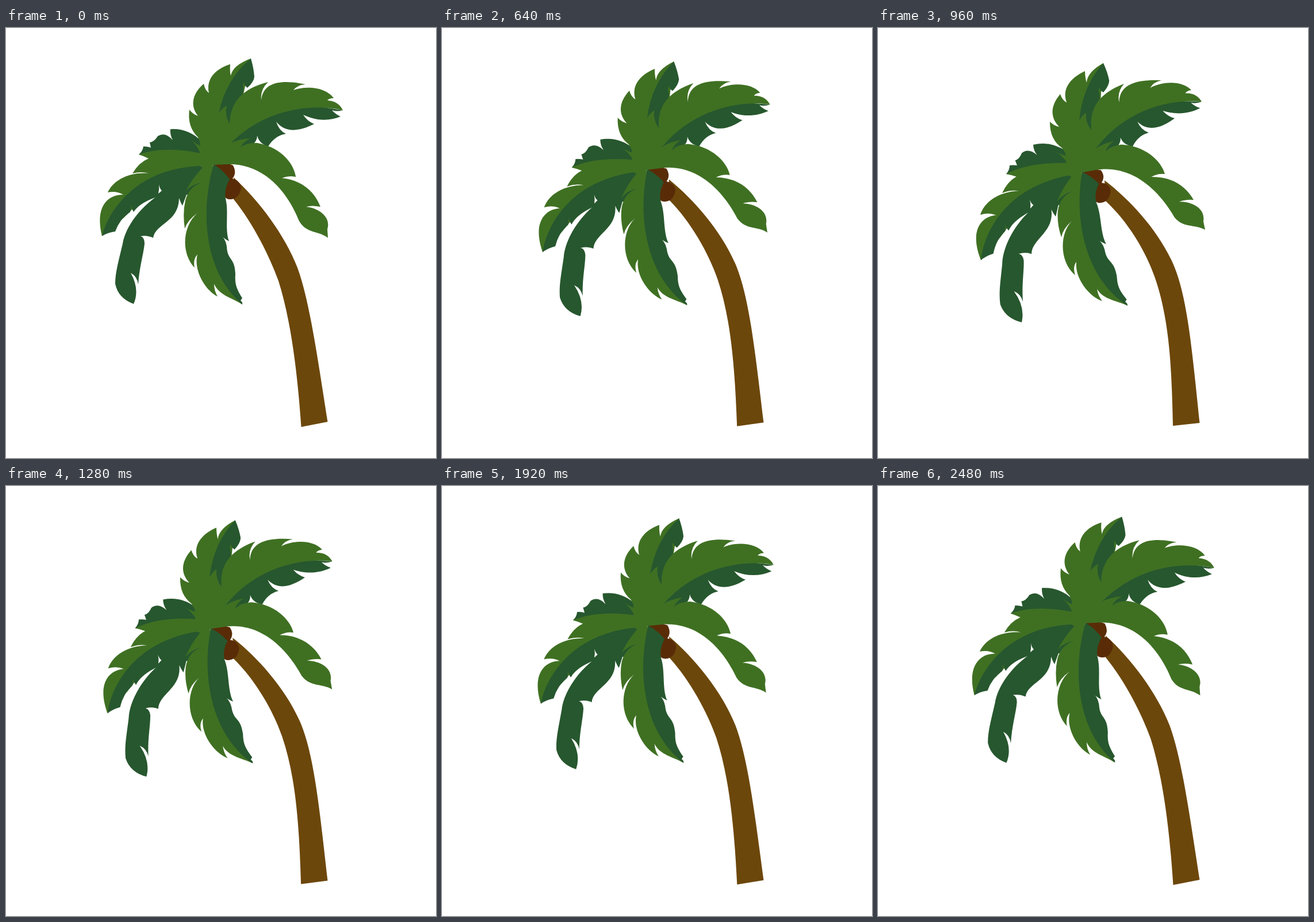
Write an HTML page that moves like this. It is 748 px wide and 748 px high and loops after 2560 ms.

```html
<!DOCTYPE html>
<html lang="en">
<head>
<meta charset="utf-8">
<title>Swaying palm</title>
<style>
  html, body { margin: 0; height: 100%; overflow: hidden; background: #fff; }
  svg { display: block; width: 100vw; height: 100vh; }
</style>
</head>
<body>
<svg id="stage" viewBox="0 0 748 748"></svg>
<script>
const LIGHT = '#3f7022', DARK = '#27572e', TRUNK = '#6c470b', NUT = '#592c07';
const LOOP = 2560, STEP = 80, PEAK = 960;

// Resting outlines, back to front
const crown = [
  // back left frond
  [DARK, `M286,176 Q317,174 340,197 L350,225 L300,235 L231,220 Q238,214 239,206 Q246,206 252,208
    L250,199 Q258,198 264,188 Q277,180 290,195 Q285,186 286,176 Z`],
  // left frond
  [LIGHT, `M231,220 C262,209 300,210 338,218 Q333,204 321,194 Q332,203 341,206 L365,215 L362,238
    L335,250 L250,285 L205,330 Q180,345 167,362 C154,310 178,289 204,290 Q192,283 177,286
    C187,264 215,250 249,253 Q235,249 220,253 Q231,234 248,227 Q240,223 231,220 Z`],
  [DARK, `M167,362 C176,325 220,245 337,240 L342,243 L348,240 L362,262 L345,290 L314,290 L307,309
    Q303,303 300,292 L262,294 Q232,304 222,320 Q217,312 217,303 Q218,314 216,320
    Q198,332 190,354 Q176,356 167,362 Z`],
  // hanging frond
  [DARK, `M258,296 C228,318 207,350 203,375 C196,405 190,425 190,445 Q195,470 222,480
    Q233,455 217,426 Q228,432 230,446 C232,415 239,395 241,375 Q241,364 234,362 Q246,360 256,365
    C260,340 300,338 301,297 L310,280 L285,275 Z`],
  ['#fff', 'M266,272 Q267,279 271,283 L265,288 Q267,280 266,272 Z'],
  // top frond
  [LIGHT, `M338,200 L334,190 Q315,172 319,142 Q325,150 334,153 C322,138 321,117 344,97
    Q346,108 353,113 C348,90 362,72 390,63 Q389,75 391,83 Q394,65 426,53 L410,130 L392,170
    L380,225 L362,238 L342,243 L336,238 Z`],
  [DARK, `M426,53 Q383,88 370,148 Q375,140 384,135 Q380,152 389,167 L405,150 L413,108
    Q411,100 414,94 Q414,100 420,104 Q431,94 432,85 Q431,70 426,53 Z`],
  ['trunk'],
  [NUT, `M361,238 Q380,232 395,239 Q402,252 394,262 Q408,266 409,279 Q405,298 390,298
    Q382,298 380,292 L365,260 Z`],
  // right frond
  [DARK, `M586,143 Q576,146 567,143 Q573,150 582,154 C562,162 540,162 517,151 Q524,162 536,167
    C510,180 486,183 470,163 Q475,179 487,184 Q468,187 456,206 Q440,201 437,187 Q437,195 431,201
    L400,215 L360,240 L400,170 L500,130 Z`],
  [LIGHT, `M362,237 L375,190 L389,167 C390,128 412,105 456,94 Q442,107 444,125
    C448,92 482,90 521,98 Q507,99 500,108 C525,99 558,104 570,122 Q562,122 559,126
    Q578,127 586,143 C500,125 410,160 362,237 Z`],
  // lower right frond
  [LIGHT, `M361,238 C370,210 390,194 425,192 Q412,198 408,208 Q418,199 437,200
    C477,207 501,235 504,259 Q492,256 480,261 C517,265 538,287 547,311 Q532,308 522,311
    C543,313 566,328 559,350 L560,365 C543,352 523,358 510,336 C497,303 460,235 385,237 Z`],
  // front frond
  [LIGHT, `M347,238 Q326,258 313,283 Q325,271 341,269 Q318,276 312,300 Q307,322 311,349
    Q316,334 333,322 C308,343 303,390 328,417 Q325,402 333,394 C326,420 345,455 368,467
    Q362,457 362,445 C370,465 395,470 411,481 L375,420 L365,240 Z`],
  [DARK, `M361,238 C340,310 340,420 411,481 Q412,477 408,474 L411,470 C400,452 398,445 399,428
    C398,398 385,405 384,380 Q382,365 370,357 Q377,365 388,371 C380,350 388,320 382,297
    Q379,281 389,263 Q377,247 364,239 Z`],
];

// x, y, shift x, shift y at full sway
const pins = [
  [426,53,-34,8], [390,63,-30,12], [344,97,-27,18], [319,142,-20,21], [420,104,-28,8],
  [456,94,-28,3], [521,98,-28,-7], [570,122,-25,-14], [586,143,-23,-15], [536,167,-20,-10],
  [487,184,-16,-2], [456,206,-13,0], [504,259,-5,-5], [547,311,2,-12], [560,365,9,-14],
  [363,238,-6,13], [390,298,-2,6], [411,481,23,2], [388,371,9,5], [328,417,15,13],
  [368,467,22,8], [311,349,8,15], [307,308,2,19], [256,364,11,28], [231,446,22,30],
  [222,480,28,32], [167,362,12,42], [177,286,1,39], [220,253,-4,34], [231,220,-8,34],
  [286,176,-16,27],
];

const trunkRest = `M396,260 C440,300 485,360 507,417 C527,472 540,560 559.5,685 L513.5,694
  C507,600 496,510 474,440 C459,398 430,340 396,298 Z`;
const trunkBent = `M394,265 C440,300 490,355 515,414 C537,468 545,545 559.5,687 L513,692
  C511,600 508,510 482,435 C466,388 434,336 396,301 Z`;

const PAIR = /([\d.]+),([\d.]+)/g;
const points = d => [...d.matchAll(PAIR)].map(m => [+m[1], +m[2]]);

// The crown tilts as a whole; the pins add the local bending
const tilt = -7.7 * Math.PI / 180, cos = Math.cos(tilt), sin = Math.sin(tilt);
function turn(x, y) {
  const u = x - 477, v = y - 308;
  return [u * cos - v * sin - u, u * sin + v * cos - v];
}
const bends = pins.map(([x, y, dx, dy]) => {
  const [tx, ty] = turn(x, y);
  return [x, y, dx - tx, dy - ty];
});
function shift([x, y]) {
  let sx = 0, sy = 0, sum = 0;
  for (const [px, py, bx, by] of bends) {
    const w = ((x - px) ** 2 + (y - py) ** 2 + 40) ** -1.5;
    sx += w * bx;
    sy += w * by;
    sum += w;
  }
  const [tx, ty] = turn(x, y);
  return [tx + sx / sum, ty + sy / sum];
}

const stage = document.getElementById('stage');
const parts = crown.map(([fill, d]) => {
  const isTrunk = fill === 'trunk';
  const shape = isTrunk ? trunkRest : d;
  const rest = points(shape);
  const bent = points(trunkBent);
  const move = rest.map((p, i) => isTrunk ? [bent[i][0] - p[0], bent[i][1] - p[1]] : shift(p));
  const el = document.createElementNS('http://www.w3.org/2000/svg', 'path');
  el.setAttribute('fill', isTrunk ? TRUNK : fill);
  stage.append(el);
  return { el, shape, rest, move };
});

function draw(t) {
  const k = t < PEAK ? t / PEAK : (LOOP - t) / (LOOP - PEAK);
  for (const { el, shape, rest, move } of parts) {
    let i = 0;
    el.setAttribute('d', shape.replace(PAIR, () => {
      const [x, y] = rest[i], [dx, dy] = move[i++];
      return (x + dx * k).toFixed(2) + ',' + (y + dy * k).toFixed(2);
    }));
  }
}

let start, last = 0;
function frame() {
  const now = performance.now();
  start ??= now;
  const t = Math.floor((now - start) % LOOP / STEP) * STEP;
  if (t !== last) draw(last = t);
  requestAnimationFrame(frame);
}
draw(0);
requestAnimationFrame(frame);
</script>
</body>
</html>
```
